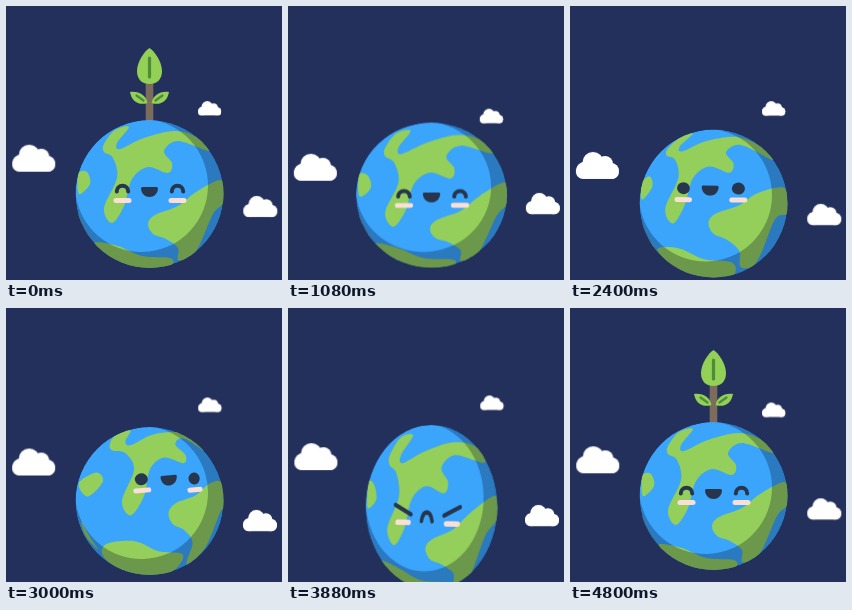
An HTML page for the animation above (4840 ms loop, 276 px wide and 274 px high).

```html
<!DOCTYPE html>
<html lang="en">
<head>
<meta charset="utf-8">
<title>Little planet</title>
<style>
  html, body { margin: 0; width: 100%; height: 100%; overflow: hidden; background: #23305c; }
  svg { display: block; width: 100vw; height: 100vh; }

  .cloud { fill: #fff; }
  .small { animation: bob-small 2420ms cubic-bezier(.37, 0, .63, 1) -1210ms infinite alternate; }
  .left { animation: bob-left 2420ms cubic-bezier(.37, 0, .63, 1) -810ms infinite alternate; }
  .right { animation: bob-right 4840ms infinite; }
  @keyframes bob-small {
    from { transform: translate(192.3px, 87px) scale(.54); }
    to { transform: translate(191.8px, 102.8px) scale(.54); }
  }
  @keyframes bob-left {
    from { transform: translate(6.4px, 135px); }
    to { transform: translate(5.8px, 149.4px); }
  }
  @keyframes bob-right {
    0%, 100% { transform: translate(237.3px, 190px) scale(.79); animation-timing-function: ease-out; }
    31% { transform: translate(238px, 186.5px) scale(.79); animation-timing-function: ease-in-out; }
    60% { transform: translate(237px, 202px) scale(.79); animation-timing-function: ease-in; }
    80% { transform: translate(237px, 197px) scale(.79); animation-timing-function: linear; }
  }

  .land { fill: #93cf5a; }
  .leaf { fill: #92d155; }
  .vein { fill: none; stroke: #508a3b; stroke-width: 3.2; stroke-linecap: round; }
  .ink { fill: #27364d; }
  .line { fill: none; stroke: #27364d; stroke-width: 4; stroke-linecap: round; stroke-linejoin: round; }
  .cheek { fill: #fbdfd6; }
  .happy, .open, .angry { display: none; }
  [data-mood=happy] .happy, [data-mood=open] .open, [data-mood=angry] .angry { display: inline; }
</style>
</head>
<body>
<svg viewBox="0 0 276 274">
  <defs>
    <g id="cloud">
      <rect y="12.5" width="43" height="14.5" rx="7.2"/>
      <circle cx="8.5" cy="18.5" r="8.5"/>
      <circle cx="17" cy="10.5" r="10.5"/>
      <circle cx="29" cy="12" r="8"/>
      <circle cx="35" cy="19" r="8"/>
    </g>
    <clipPath id="disc"><circle r="74"/></clipPath>
    <path id="arch" d="M-5.7 2.5A5.7 5.7 0 0 1 5.7 2.5"/>
    <path id="smile" d="M-7-5H7Q8.5-5 8.5-3.5C8 2 4.5 5 0 5S-8 2-8.5-3.5Q-8.5-5-7-5Z"/>
    <rect id="blush" x="-9" y="-2.5" width="18" height="5" rx="2.5"/>
  </defs>

  <g id="plant">
    <rect x="-3.8" y="-42" width="7.6" height="56" fill="#7c6c5c"/>
    <path class="leaf" d="M0-72C5-69 12.5-58 12.5-49C12.5-40 7-36 0-36S-12.5-40-12.5-49C-12.5-58-5-69 0-72Z"/>
    <path class="vein" d="M0-62V-43"/>
    <g id="sprig">
      <path class="leaf" d="M-2-17C-4-25-10-29-19.5-28C-18-19-11-14-2-17Z"/>
      <path class="vein" style="stroke-width:2.2" d="M-6-19.5L-13-24.5"/>
    </g>
    <use href="#sprig" transform="scale(-1 1)"/>
  </g>

  <g class="cloud small"><use href="#cloud"/></g>

  <g id="globe">
    <g clip-path="url(#disc)">
      <circle r="74" fill="#3ba4fb"/>
      <path id="land" class="land"/>
    </g>
    <path d="M4-73.9A74 74 0 1 1-74-.4A66.5 66.5 0 1 0 4-73.9Z" fill="rgba(0,5,30,.27)"/>
    <g id="face">
      <use href="#blush" class="cheek" data-at="-27 6.5"/>
      <use href="#blush" class="cheek" data-at="28 6.5"/>
      <g data-at="-27 -5">
        <use href="#arch" class="line happy"/>
        <ellipse class="ink open" rx="6.5" ry="6"/>
        <path class="line angry" d="M-9-4L9 4"/>
      </g>
      <g data-at="28 -5">
        <use href="#arch" class="line happy"/>
        <ellipse class="ink open" rx="6.5" ry="6"/>
        <path class="line angry" d="M-9 4L9-4"/>
      </g>
      <g data-at="0 -2">
        <use href="#smile" class="ink happy"/>
        <use href="#smile" class="ink open"/>
        <path class="line angry" d="M-6 6C-4-4.5 4-4.5 6 6"/>
      </g>
    </g>
  </g>

  <g class="cloud left"><use href="#cloud"/></g>
  <g class="cloud right"><use href="#cloud"/></g>
</svg>
<script>
const LOOP = 4840, R = 74, CX = 143.5, CY = 188;
const $ = id => document.getElementById(id);

// Key points of each coast, seen from the front; those past the rim lie on the far side.
const coasts = [
  `98,138 98,146 107,152 111,172 98,202 106,217 118,200 126,173 142,161 162,167 166,157
   158,145 172,135 203,145 192,131 168,125 138,132 114,143 111,137 123,121 109,124`,
  `142,218 149,209 172,200 190,186 214,174 228,185 218,198 207,208 193,240 190,262
   172,254 172,242 160,233 147,228`,
  `90,236 112,240 136,250 164,252 168,270 143,292 100,278 86,248`,
  `70,167 81,166 84,178 73,188`,
  `68,208 77,223 83,240 64,226`
].map(s => s.split(/\s+/).map(p => {
  const [x, y] = p.split(',');
  return onSphere(x - CX, y - CY);
}));

function onSphere(x, y) {
  x /= R; y /= R;
  const d = Math.hypot(x, y);
  if (d <= 1) return [x, y, Math.sqrt(1 - d * d)];
  const a = Math.PI / 2 + d - 1, k = Math.sin(a) / d;
  return [x * k, y * k, Math.cos(a)];
}

// Turns a point with the globe; hidden points are folded outside the disc.
function turn([x, y, z], { yaw, pitch, roll }) {
  const x1 = x * Math.cos(yaw) + z * Math.sin(yaw);
  const z1 = z * Math.cos(yaw) - x * Math.sin(yaw);
  const y1 = y * Math.cos(pitch) + z1 * Math.sin(pitch);
  const z2 = z1 * Math.cos(pitch) - y * Math.sin(pitch);
  const d = Math.hypot(x1, y1);
  const k = R * (z2 < 0 ? (2 - d) / d : 1), c = Math.cos(roll), s = Math.sin(roll);
  return [k * (x1 * c - y1 * s), k * (x1 * s + y1 * c)];
}

// Closed Catmull-Rom curve.
function smooth(pts) {
  const n = pts.length, at = i => pts[(i + n) % n];
  const ctrl = (p, a, b, k) => [p[0] + (b[0] - a[0]) * k, p[1] + (b[1] - a[1]) * k];
  const str = p => p[0].toFixed(2) + ' ' + p[1].toFixed(2);
  let d = 'M' + str(pts[0]);
  for (let i = 0; i < n; i++) {
    const p = at(i), q = at(i + 1);
    d += 'C' + [ctrl(p, at(i - 1), q, 1 / 6), ctrl(q, p, at(i + 2), -1 / 6), q].map(str).join(' ');
  }
  return d + 'Z';
}

function pose(t) {
  const ramp = (a, b) => (1 - Math.cos(Math.PI * Math.min(1, Math.max(0, (t - a) / (b - a))))) / 2;
  const pulse = (a, peak, b) => ramp(a, peak) - ramp(peak, b);

  const hop = pulse(560, 800, 960) + pulse(4000, 4200, 4400);
  const drop = pulse(880, 1000, 1100), squash = pulse(900, 1000, 1200);
  const settle = pulse(4340, 4440, 4600);
  const look = ramp(1200, 1500) - ramp(3360, 3680);
  const swing = ramp(2240, 2600), dip = pulse(2240, 2440, 2680);
  const focus = ramp(3360, 3680) - ramp(3960, 4120);
  const strain = ramp(3400, 3860) - ramp(3900, 4000);
  const yaw = .29 * look * (2 * swing - 1) - .07 * focus;
  return {
    y: CY - 25 * hop + 13 * drop + 3 * settle + 5 * look + 5 * dip + 11 * strain,
    stretch: .11 * strain - .03 * (squash + settle),
    yaw,
    pitch: .12 * focus + .09 * squash + .1 * dip - .24 * look - .13 * hop,
    roll: -.3 * yaw,
    grow: (1 - ramp(840, 960) + ramp(4020, 4160)) * (1 + .25 * hop),
    mood: t < 1240 || t >= 4060 ? 'happy' : t < 3500 ? 'open' : 'angry'
  };
}

const features = [...document.querySelectorAll('[data-at]')].map(el => {
  const [x, y] = el.dataset.at.split(' ').map(Number);
  return { el, point: onSphere(x, y), width: Math.sqrt(1 - (x / R) ** 2) };
});

function draw(t) {
  const p = pose(t);
  $('globe').setAttribute('transform', `translate(${CX} ${p.y}) scale(${1 - p.stretch} ${1 + p.stretch})`);
  $('land').setAttribute('d', coasts.map(c => smooth(c.map(pt => turn(pt, p)))).join(''));

  $('plant').setAttribute('transform',
    `translate(${CX} ${p.y - R * (1 + p.stretch)}) scale(${Math.min(1, p.grow * 1.5)} ${p.grow})`);
  $('plant').setAttribute('visibility', p.grow > .01 ? 'visible' : 'hidden');

  $('face').dataset.mood = p.mood;
  const tilt = p.roll * 180 / Math.PI;
  for (const { el, point, width } of features) {
    const [x, y] = turn(point, p);
    const squeeze = Math.min(1, Math.sqrt(1 - (x / R) ** 2) / width);
    el.setAttribute('transform', `translate(${x} ${y}) rotate(${tilt}) scale(${squeeze} 1)`);
  }
}

const start = performance.now();
function frame(now) {
  draw(Math.max(0, now - start) % LOOP);
  requestAnimationFrame(frame);
}
draw(0);
requestAnimationFrame(frame);
</script>
</body>
</html>
```
